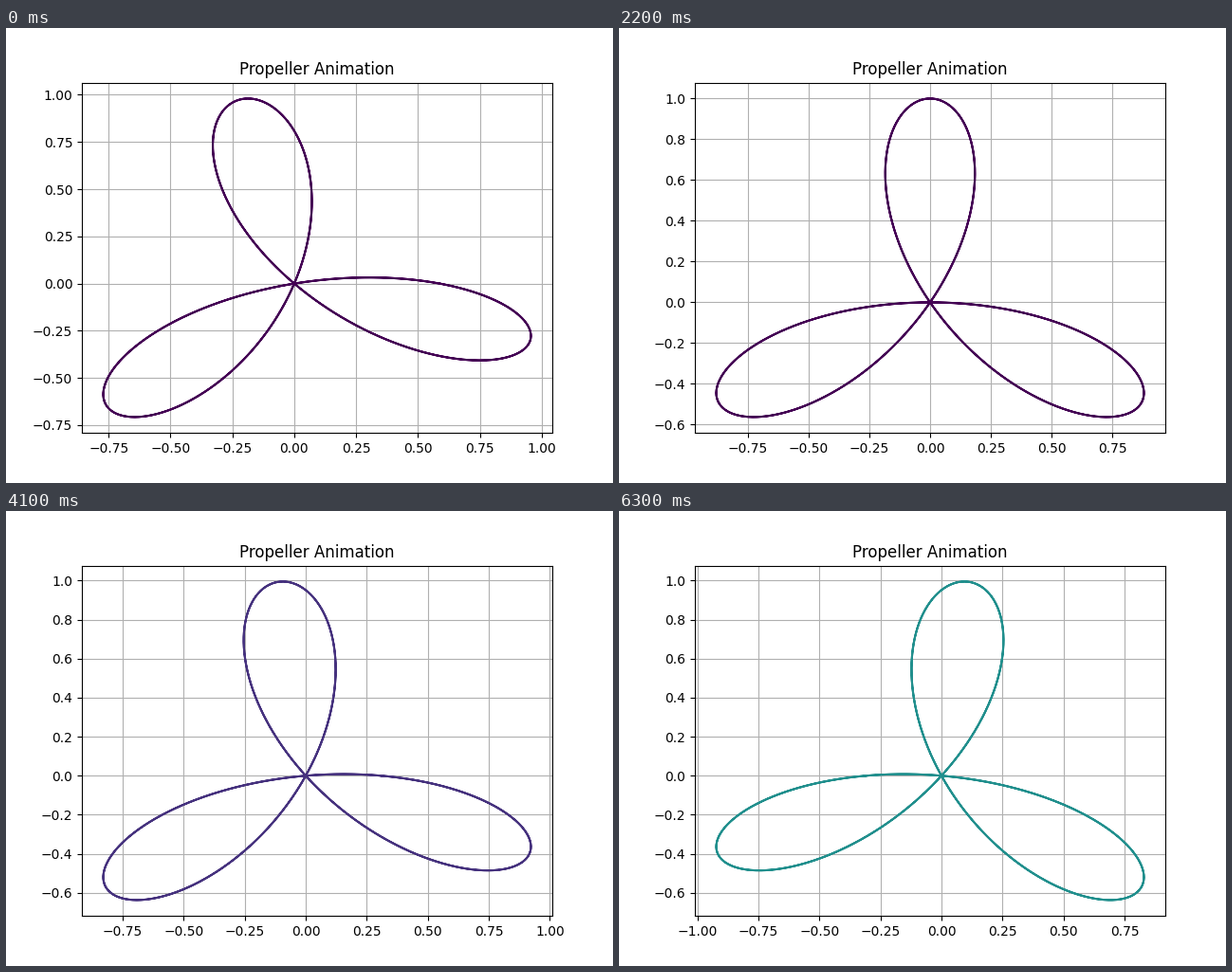
A matplotlib script that plays this animation: 640 px wide and 480 px high, repeating every 6.4 s.

```python
import matplotlib.pyplot as plt
import numpy as np
from matplotlib.animation import FuncAnimation

FRAMES = 64
INTERVAL = 100

theta = np.linspace(0, 2 * np.pi, 1000)
fig, ax = plt.subplots(figsize=(6.4, 4.8), dpi=100)


def update(n):
    """Draw the three-petal rose, turned 6 degrees clockwise per step."""
    t = (n - FRAMES // 2) / 10
    r = np.sin(3 * theta + np.pi * t)
    # The colour stays at the dark end of the map until t passes zero.
    color = plt.cm.viridis(max(0.0, t / (2 * np.pi)))

    ax.clear()
    ax.plot(r * np.cos(theta), r * np.sin(theta), color=color, lw=1.5)
    ax.set_title("Propeller Animation")
    ax.grid(True)
    return ax.lines


anim = FuncAnimation(fig, update, frames=FRAMES, interval=INTERVAL,
                     init_func=lambda: update(0), repeat=True, repeat_delay=0)

plt.show()
```
